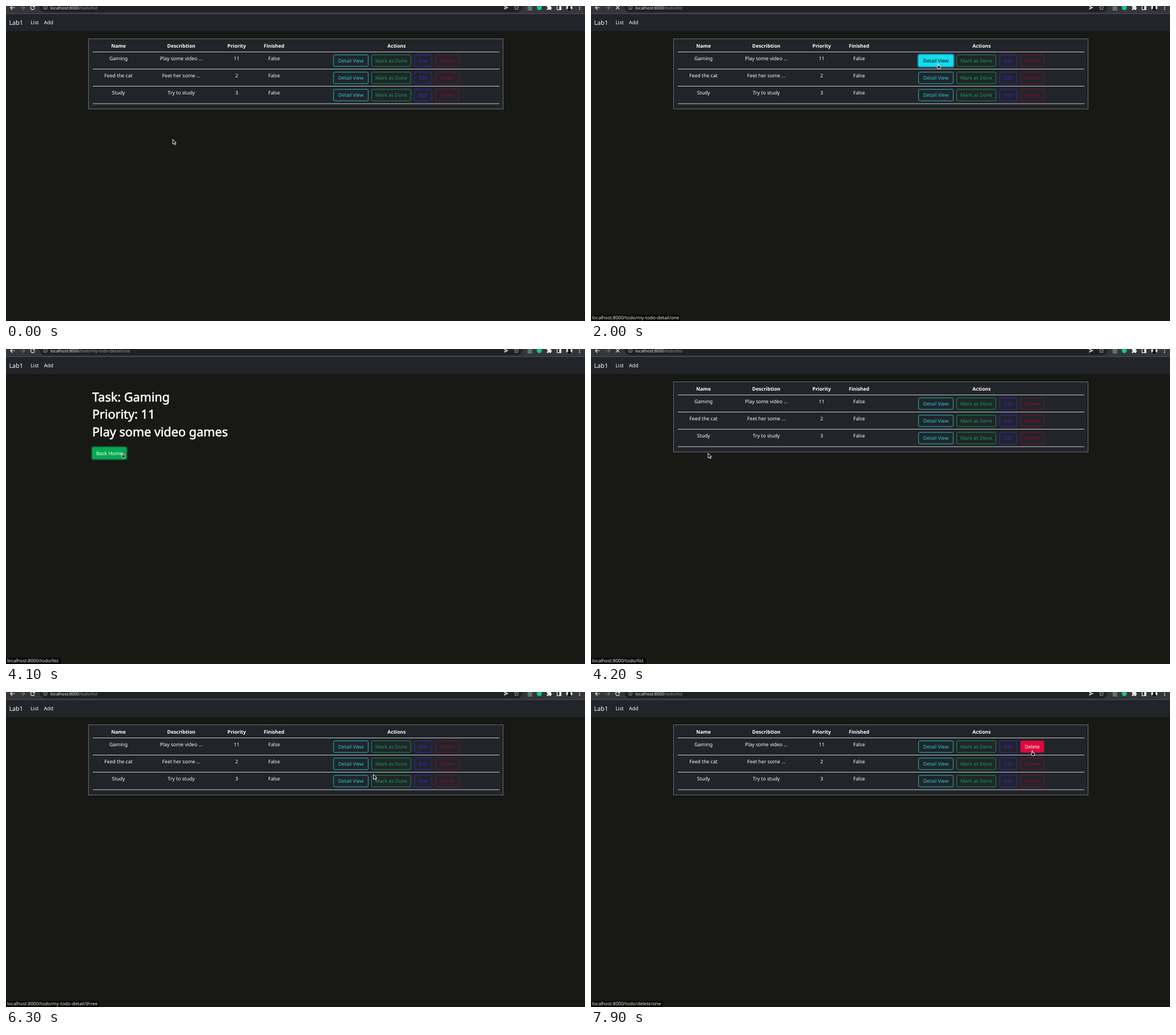
Recreate the animation shown at these times as an HTML page. Size 1014x552 px, loop 8000 ms.

```html
<!DOCTYPE html>
<html lang="en">
<head>
<meta charset="utf-8">
<title>Todo list</title>
<style>
  html, body { margin: 0; width: 100%; height: 100%; overflow: hidden; background: #181814; }
  svg { display: block; }
  text { font: 8.65px "Noto Sans", "Open Sans", sans-serif; fill: #fff; text-rendering: geometricPrecision; white-space: pre; }
  .mid text, .btn text { text-anchor: middle; }
  .head text { font-weight: 700; font-size: 8.6px; }
  .title text { font-size: 21.6px; stroke: #fff; stroke-width: .6; }
  .nav text { font-size: 8.8px; }
  .nav .brand { font-size: 10.7px; }
  #url { font-size: 7.45px; fill: #e8eaed; }
  #path { fill: #9a9da1; }
  #status text { font-size: 8.15px; fill: #f0f0ee; }
  .icon { fill: none; stroke: #e8eaed; stroke-width: 1.2; }
  .faint { stroke: #a4a7ab; stroke-width: .9; }
  .solid { fill: #e8eaed; }
</style>
</head>
<body>
<svg width="1014" height="552" viewBox="0 0 1014 552">
  <rect width="1014" height="552" fill="#181814"/>

  <!-- browser toolbar -->
  <rect width="1014" height="13" fill="#35363a"/>
  <rect x="59" y="-9" width="845" height="20" rx="9" fill="#202124"/>
  <rect y="13" width="1014" height="1" fill="#505154"/>
  <path class="icon" d="M15.5 3H8M11.3-.6L7.7 3l3.6 3.6"/>
  <path class="icon" style="stroke:#77797d" d="M25 3h7.5M29.2-.6L32.8 3l-3.6 3.6"/>
  <g id="reload"><path class="icon" d="M49.3.9A3.4 3.4 0 1 0 50 3.6"/><path class="solid" d="M50.5-1.5v3.7h-3.7z"/></g>
  <path id="stop" class="icon" d="M43.7-.1l6 6M49.7-.1l-6 6"/>
  <circle class="icon faint" cx="69" cy="2.8" r="3.2"/>
  <path class="icon faint" d="M69 2.400v2.4M69 .7v.9"/>
  <text id="url" x="77.7" y="5.6">localhost:8000<tspan id="path"></tspan></text>
  <path d="M872.3-.8l8 3.6-8 3.6 .4-2.9 3.6-.7-3.6-.7z" fill="#c4c6c9"/>
  <path class="icon faint" d="M894-.9l1.1 2.6 2.8.2-2.1 1.9.6 2.7-2.4-1.4-2.4 1.4.6-2.7-2.1-1.900 2.8-.2z"/>
  <rect x="913.5" y="0" width="8" height="8" fill="#5c7563"/>
  <circle cx="934" cy="2.8" r="4.4" fill="#11c58d"/>
  <path class="solid" d="M947.3 0h2.2a1.4 1.4 0 0 1 2.8 0h2.2v2.3a1.4 1.4 0 0 1 0 2.8v2h-2.3a1.3 1.3 0 0 0-2.6 0h-2.3v-2.3a1.3 1.3 0 0 0 0-2.6z"/>
  <rect class="icon" x="965.1" y="-1" width="6.8" height="7.5"/>
  <path class="solid" d="M969-1h3v7.5h-3z"/>
  <circle cx="986.5" cy="3" r="5.5" fill="#dcdcdc"/>
  <path d="M982.5 7q.5-3 2.6-3.3a2.3 2.3 0 1 1 2.8 0q2.1.3 2.6 3.3a5.5 5.5 0 0 1-8 0z" fill="#111"/>
  <g class="solid"><circle cx="1004.5" cy="0" r=".95"/><circle cx="1004.5" cy="3" r=".95"/><circle cx="1004.5" cy="6" r=".95"/></g>

  <!-- site navigation -->
  <rect y="14" width="1014" height="30" fill="#212529"/>
  <g class="nav">
    <text class="brand" x="5.5" y="33">Lab1</text>
    <text x="43" y="32.3">List</text>
    <text x="66.5" y="32.3">Add</text>
  </g>

  <g id="list">
    <rect x="144.5" y="57.5" width="726" height="123" fill="#212529" stroke="#686d72"/>
    <path d="M152 80.5h712M152 110.5h712M152 140.5h712M152 171.2h712" stroke="#c9cacb"/>
    <g class="mid head" id="head"></g>
    <g class="mid" id="cells"></g>
  </g>

  <g id="detail">
    <g class="title">
      <text x="151" y="91.6">Task: Gaming</text>
      <text x="151" y="122.4">Priority: 11</text>
      <text x="151" y="153.2">Play some video games</text>
    </g>
  </g>

  <g id="status">
    <path id="plate" fill="#050504"/>
    <text x="2" y="549.3"></text>
  </g>

  <g id="cursor" stroke="#fff" stroke-width=".9" stroke-linejoin="round" fill="#161616">
    <path id="arrow" d="M.5.5v8.7l2.1-1.9 1.5 3 1.5-.7-1.4-2.9h2.5z"/>
    <path id="hand" d="M-.7.5q.7-1 1.4 0v3.200l2.300.5q1 .4.9 1.500l-.5 3.300h-3.600l-2-3.100q.1-1.100 1.200-.6z"/>
  </g>
</svg>

<script>
const $ = id => document.getElementById(id);
const LOOP = 8000, STEP = 100;

function add(parent, tag, attrs, text) {
  const el = document.createElementNS(parent.namespaceURI, tag);
  for (const k in attrs) el.setAttribute(k, attrs[k]);
  if (text) el.textContent = text;
  parent.appendChild(el);
  return el;
}

// Table
const columns = [197, 307, 404, 469.5, 684];
const heads = ['Name', 'Describtion', 'Priority', 'Finished', 'Actions'];
const rows = [
  ['Gaming', 'Play some video …', '11', 'False'],
  ['Feed the cat', 'Feet her some …', '2', 'False'],
  ['Study', 'Try to study', '3', 'False']
];
const kinds = [
  { label: 'Detail View', x: 573.7, w: 60.6, line: '#22cfe6', fill: '#14dcf0', ink: '#000' },
  { label: 'Mark as Done', x: 640.5, w: 68.4, line: '#0ca655', fill: '#06a850', ink: '#fff' },
  { label: 'Edit', x: 715.6, w: 30.2, line: '#3f20dc', fill: '#3f1ee0', ink: '#fff' },
  { label: 'Delete', x: 752.5, w: 40.6, line: '#980a36', fill: '#dc0a3c', ink: '#fff' }
];
const PITCH = 30.2, HEIGHT = 20.1;
const buttons = [];

function addButton(page, kind, x, y) {
  const g = add($(page), 'g', { class: 'btn' });
  const ring = add(g, 'rect', { x: x - 1.2, y: y - 1.2, width: kind.w + 2.4, height: HEIGHT + 2.4, rx: 3,
    fill: 'none', stroke: kind.fill, 'stroke-width': 2, 'stroke-opacity': .5 });
  const rect = add(g, 'rect', { x, y, width: kind.w, height: HEIGHT, rx: 2,
    fill: kind.fill, stroke: kind.line, 'stroke-opacity': .85 });
  const text = add(g, 'text', { x: x + kind.w / 2, y: y + 13.2 }, kind.label);
  const b = { page, kind, x, y, ring, rect, text };
  buttons.push(b);
  return b;
}

heads.forEach((h, i) => add($('head'), 'text', { x: columns[i], y: 72.5 }, h));
rows.forEach((row, r) => {
  row.forEach((cell, i) => add($('cells'), 'text', { x: columns[i], y: 95 + r * PITCH }, cell));
  kinds.forEach(k => addButton('list', k, k.x, 85.7 + r * PITCH));
});
const viewBtn = buttons[0];
const backBtn = addButton('detail', { ...kinds[1], label: 'Back Home', w: 59 }, 151.5, 172.5);

// Pointer path: time, x, y
const way = [
  [0, 291.5, 233], [700, 291.5, 233], [1000, 514.5, 186.5], [1100, 514.5, 186.5],
  [1600, 608, 101], [2700, 608, 101], [2900, 324.5, 164], [3100, 324.5, 164],
  [3200, 290.5, 169], [3300, 290.5, 169], [3700, 204.5, 182], [4700, 204.5, 182],
  [5000, 345, 203], [5100, 345, 203], [5200, 475, 178], [5300, 475, 178],
  [5400, 490.5, 179], [5600, 490.5, 179], [6000, 608, 160], [6200, 608, 160],
  [6300, 643, 144], [6400, 691, 144], [6500, 676, 144], [6600, 676, 144],
  [6900, 672, 138], [7000, 672, 138], [7100, 717, 129], [7300, 735, 126],
  [7500, 770, 118], [7700, 773, 102.5], [LOOP, 773, 102.5]
];

function pointer(t) {
  const i = Math.max(1, way.findIndex(p => p[0] >= t));
  const [t0, x0, y0] = way[i - 1], [t1, x1, y1] = way[i];
  const k = Math.max(0, (t - t0) / (t1 - t0));
  return [x0 + (x1 - x0) * k, y0 + (y1 - y0) * k];
}

const pageAt = t => t >= 2200 && t < 4200 ? 'detail' : 'list';

function over(b, t) {
  const [x, y] = pointer(t);
  return b.page === pageAt(t) && x >= b.x && x <= b.x + b.kind.w && y >= b.y && y <= b.y + HEIGHT;
}

// Share of the last few milliseconds spent on the button
function hoverLevel(b, t) {
  let n = 0;
  for (let i = 0; i < 5; i++) n += over(b, t - i * 5);
  return n / 5;
}

// Link preview: from, fade, gone, path, width
const previews = [
  [1700, 2400, 2500, '/todo/my-todo-detail/one', 156],
  [3800, 4600, 4800, '/todo/list', 95.5],
  [6100, 6700, 6900, '/todo/my-todo-detail/three', 163],
  [7700, LOOP, LOOP, '/todo/delete/one', 125.5]
];

const show = (el, on) => el.style.display = on ? '' : 'none';

function drawStatus(t) {
  const p = previews.find(p => t >= p[0] && t < p[2]);
  show($('status'), p);
  if (!p) return;
  const [, fade, , path, w] = p;
  $('status').style.opacity = t < fade ? 1 : .5;
  $('status').lastElementChild.textContent = 'localhost:8000' + path;
  $('plate').setAttribute('d', `M0 541.5H${w - 2}q2 0 2 2V552H0z`);
}

function draw(t) {
  const page = pageAt(t);
  show($('list'), page === 'list');
  show($('detail'), page === 'detail');
  $('path').textContent = page === 'list' ? '/todo/list' : '/todo/my-todo-detail/one';

  const loading = t >= 1900 && t < 2400 || t >= 4200 && t < 4400;
  show($('stop'), loading);
  show($('reload'), !loading);

  let link = false;
  for (const b of buttons) {
    const level = hoverLevel(b, t), lit = level > .5;
    link = link || over(b, t);
    b.rect.setAttribute('fill-opacity', level);
    b.rect.setAttribute('stroke', lit ? b.kind.fill : b.kind.line);
    b.text.style.fill = lit ? b.kind.ink : b.kind.line;
    show(b.ring, b === viewBtn && t >= 1900 && t < 2200 || b === backBtn && t >= 4000 && t < 4200);
  }

  drawStatus(t);
  $('cursor').setAttribute('transform', `translate(${pointer(t)})`);
  show($('hand'), link);
  show($('arrow'), !link);
}

const start = performance.now();
function tick() {
  const t = (performance.now() - start) % LOOP;
  draw(Math.floor(t / STEP) * STEP);
  requestAnimationFrame(tick);
}
tick();
</script>
</body>
</html>
```
